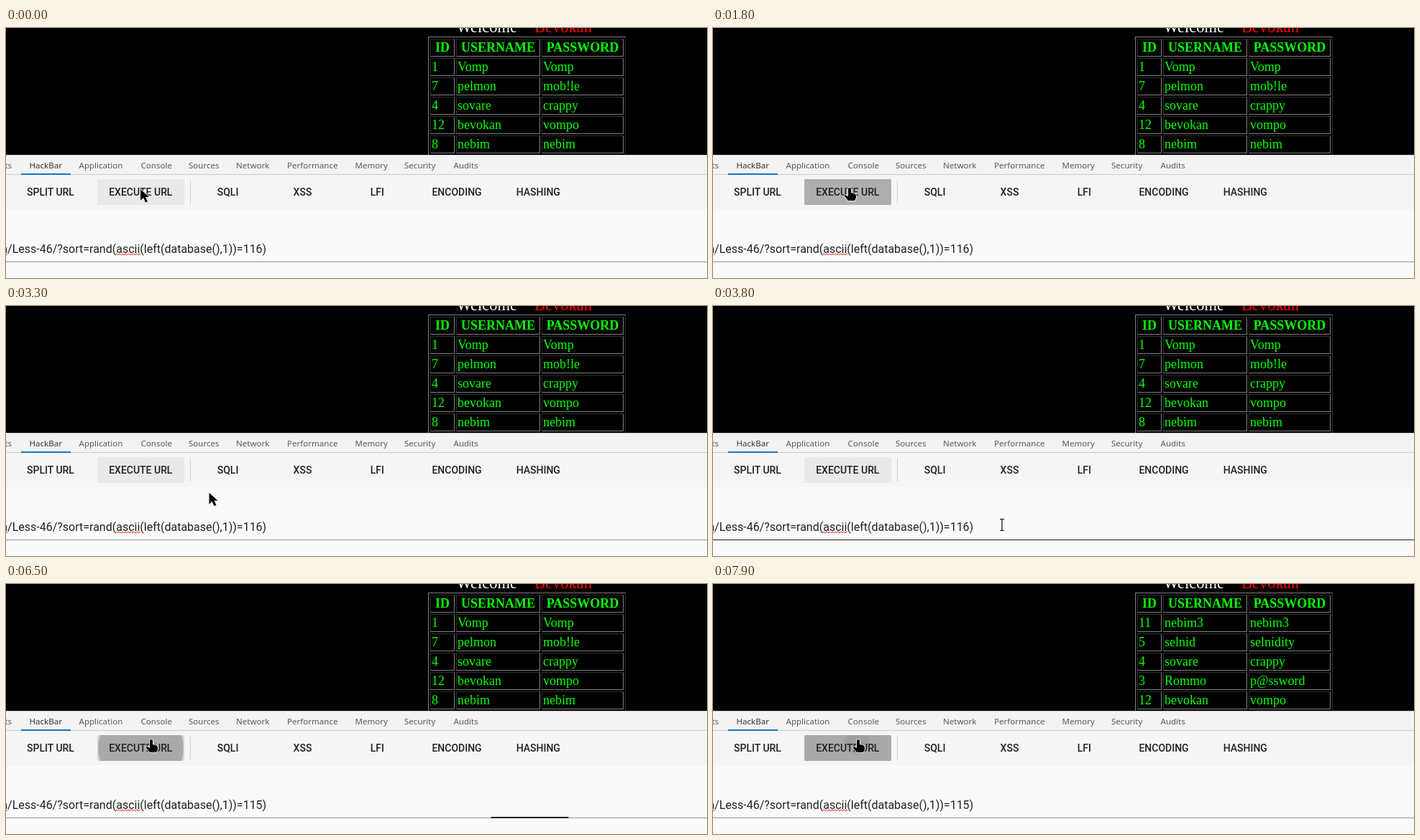
An HTML page that plays this animation: 975x349 px, repeating every 8000 ms.

```html
<!DOCTYPE html>
<html lang="en">
<head>
<meta charset="utf-8">
<style>
html, body { margin: 0; width: 100%; height: 100%; overflow: hidden; background: #000; }
table {
  position: absolute; left: 587px; top: 12px; width: 275px;
  table-layout: fixed; border-spacing: 2px; box-sizing: border-box;
  font: 18px "Liberation Serif", serif; color: #0f0;
}
table, th, td { border-color: gray; }
th, td { box-sizing: border-box; padding: 1px; white-space: nowrap; }
svg { position: absolute; left: 0; top: 0; }
.title { font: 22.5px "Liberation Serif", serif; }
.tab { font: 11.55px "Noto Sans", sans-serif; fill: #5a5a5a; }
.btn { font: 500 14px Roboto, sans-serif; fill: #212121; text-anchor: middle; }
#url { font: 16px Roboto, sans-serif; fill: #212121; white-space: pre; }
</style>
</head>
<body>
<table border="1">
  <thead><tr><th style="width:34px">ID</th><th style="width:117px">USERNAME</th><th style="width:114px">PASSWORD</th></tr></thead>
  <tbody id="rows"></tbody>
</table>
<svg width="975" height="349">
  <clipPath id="clip"><rect x="127" y="211" width="121" height="36" rx="2"/></clipPath>
  <text class="title" x="626.5" y="6" fill="#fff">Welcome</text>
  <text class="title" x="735" y="6" fill="red">Bevokan</text>

  <path fill="#f3f3f3" d="M0 177h975v28H0z"/>
  <path fill="#ccc" d="M0 177h975v1H0zM0 204h975v1H0z"/>
  <path fill="#1a73c0" d="M21 203h69v2H21z"/>
  <path fill="#f5f5f5" d="M0 205h975v48H0z"/>
  <path fill="#fafafa" d="M0 253h975v96H0z"/>
  <path fill="#cfcfcf" d="M256 213h1v32h-1z"/>
  <g clip-path="url(#clip)">
    <rect id="base" x="127" y="211" width="121" height="36"/>
    <circle id="ripple" cx="187.5" cy="229"/>
    <circle id="ripple2" cx="200" cy="221" fill="#9f9f9f"/>
  </g>
  <g id="labels"></g>

  <text id="url" x="-6.8" y="314"></text>
  <path id="squiggle" fill="none" stroke="#e33" stroke-width="1"/>
  <path id="caret" fill="#000" d="M0 298h1v20h-1z"/>
  <rect id="rule" y="326" width="975" height="1"/>
  <rect id="focus" y="325" height="2"/>

  <g id="cursor">
    <path id="arrow" d="M0 0v16l4-4 3 6.5 3-1.3-3-6.2h5z" stroke="#fff" paint-order="stroke" stroke-width="1.6"/>
    <path id="hand" d="M1 0q0-2 2-2t2 2v5l5 1q2 1 2 4v2l-2 4H1l-5-6q-1-2 1-2l4 2z" stroke="#fff" paint-order="stroke" stroke-width="1.6"/>
    <g id="beam" fill="none">
      <path stroke="#fff" stroke-width="3" d="M-3-8h6M0-8V8M-3 8h6"/>
      <path stroke="#000" stroke-width="1.2" d="M-3-8h6M0-8V8M-3 8h6"/>
    </g>
  </g>
</svg>
<script>
const LOOP = 8000, STEP = 100;
const $ = id => document.getElementById(id);
const set = (id, attrs) => { for (const k in attrs) $(id).setAttribute(k, attrs[k]); };
const show = (id, on) => set(id, { visibility: on ? "visible" : "hidden" });
const clamp = p => Math.max(0, Math.min(1, p));
const gray = v => `rgb(${v},${v},${v})`;

// Piecewise linear value through [time, value] points.
function along(t, points) {
  let [t0, v0] = points[0];
  for (const [t1, v1] of points) {
    if (t < t1) return v0 + (v1 - v0) * clamp((t - t0) / (t1 - t0));
    [t0, v0] = [t1, v1];
  }
  return v0;
}

const before = ["1 Vomp Vomp", "7 pelmon mob!le", "4 sovare crappy", "12 bevokan vompo", "8 nebim nebim"];
const after = ["11 nebim3 nebim3", "5 selnid selnidity", "4 sovare crappy", "3 Rommo p@ssword", "12 bevokan vompo"];
const toRows = list => [...list, "\u00a0 \u00a0 \u00a0"]
  .map(r => "<tr>" + r.split(" ").map(c => `<td>${c}</td>`).join("") + "</tr>").join("");

const tabs = [[-42, "Elements"], [32.5, "HackBar"], [101.5, "Application"], [187.5, "Console"], [254, "Sources"],
  [320, "Network"], [391, "Performance"], [485.5, "Memory"], [554, "Security"], [622.5, "Audits"]];
const buttons = [[62, "SPLIT URL"], [187.3, "EXECUTE URL"], [308.5, "SQLI"], [412.5, "XSS"],
  [516.3, "LFI"], [627, "ENCODING"], [740.3, "HASHING"]];
$("labels").innerHTML =
  tabs.map(([x, s]) => `<text class="tab" x="${x}" y="196"${s == "HackBar" ? ' style="fill:#333"' : ""}>${s}</text>`).join("") +
  buttons.map(([x, s]) => `<text class="btn" x="${x}" y="234">${s}</text>`).join("");
set("squiggle", { d: "M-6 316q1-2 2 0t2 0 2 0 2 0M153 316q1-2 2 0" + "t2 0".repeat(16) });

const baseGray = [[0, 233], [500, 233], [800, 212], [1400, 212], [2500, 198], [2750, 233],
  [3800, 233], [4300, 245], [5800, 245], [6100, 212]];
const rippleGray = [[700, 192], [1200, 161], [1400, 161], [2500, 198], [2750, 233], [6000, 195], [6400, 169]];
const pathX = [[0, 187], [2900, 187], [3800, 402], [4250, 402], [4500, 456], [5600, 456], [5950, 199]];
const pathY = [[0, 225], [2900, 225], [3800, 305.5], [4250, 305.5], [4500, 307.5], [5600, 307.5], [5950, 219]];
const rippleSize = (t, start) => 63.5 * (1 - (1 - clamp((t - start) / 676)) ** 2);

let loaded;
function draw(t) {
  const x = along(t, pathX), y = along(t, pathY);
  const inField = y > 280;
  const onButton = t >= 200 && x < 248 && y < 247;
  const second = t >= 6000;

  const done = t >= 6900;
  if (done !== loaded) {
    $("rows").innerHTML = toRows(done ? after : before);
    loaded = done;
  }

  set("base", { fill: gray(along(t, baseGray)) });
  set("ripple", { r: t < 2750 || second ? rippleSize(t, second ? 6000 : 700) : 0, fill: gray(along(t, rippleGray)) });
  set("ripple2", { r: rippleSize(t, 7800) });

  const digits = t < 4600 ? "116" : t < 5300 ? "11" : "115";
  $("url").textContent = `n/Less-46/?sort=rand(ascii(left(database(),1))=${digits})`;
  show("caret", t >= 4300 && t < 4800 || t >= 5300 && t < 5900);
  set("caret", { transform: `translate(${digits.length == 2 ? 347 : 356} 0)` });

  const focused = t >= 4300 && t < 5950;
  const width = 1480 * (t < 5950 ? 1 - (1 - clamp((t - 4300) / 600)) ** 1.7 : (1 - clamp((t - 5950) / 700)) ** 1.7);
  set("focus", { x: 728.5 - width / 2, width, fill: focused ? "#1976b8" : "#212121" });
  set("rule", { fill: inField && !focused ? "#212121" : "#949494" });

  set("cursor", { transform: `translate(${x} ${y})` });
  show("beam", inField);
  show("hand", onButton);
  show("arrow", !inField && !onButton);
}

function tick() {
  draw(Math.floor(performance.now() % LOOP / STEP) * STEP);
  requestAnimationFrame(tick);
}
tick();
</script>
</body>
</html>
```
